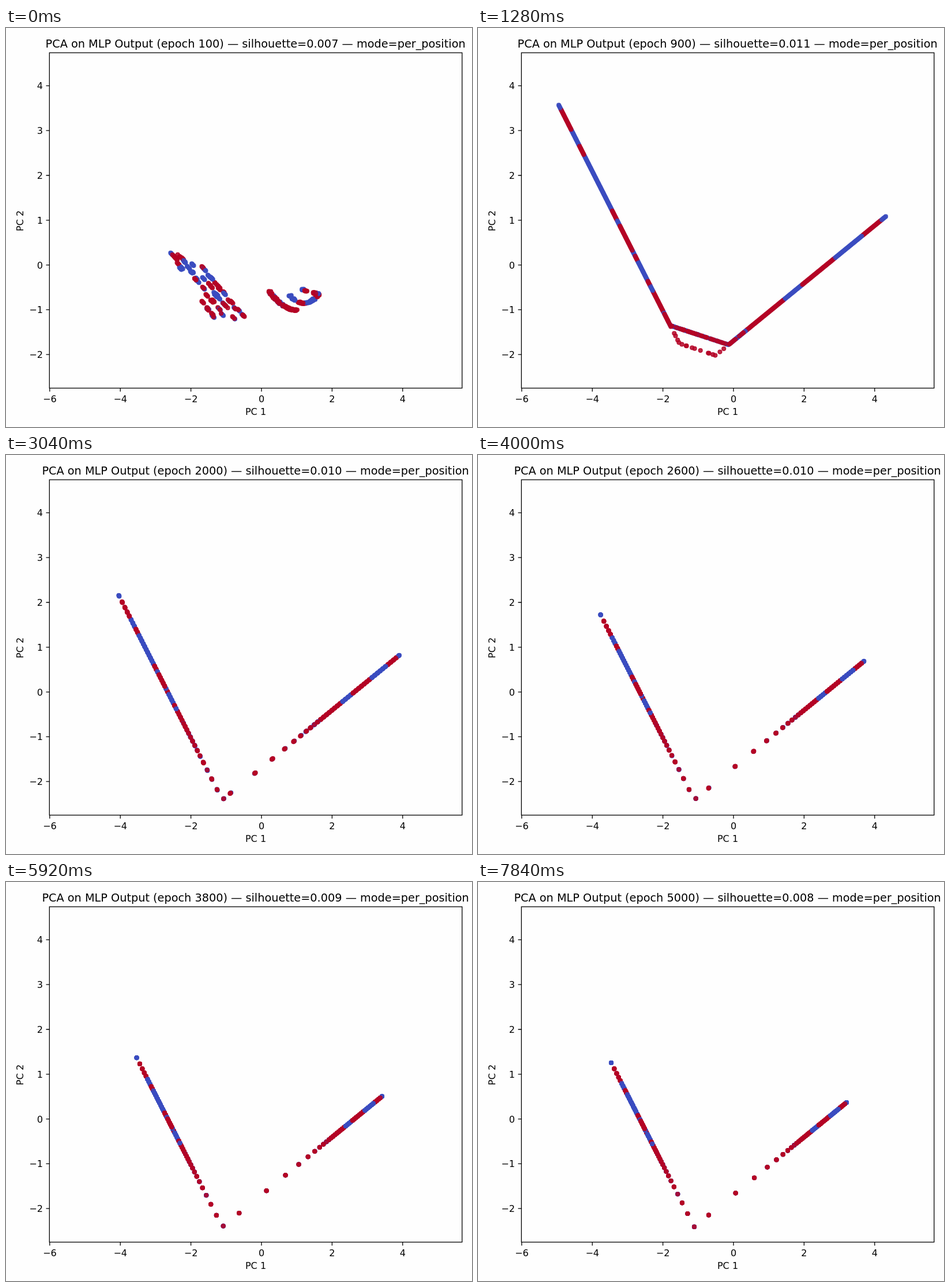
Recreate the animation shown at these times as an HTML page with a canvas. Size 808 px wide and 693 px high, loop 8000 ms.

```html
<!DOCTYPE html>
<html lang="en">
<head>
<meta charset="utf-8">
<title>PCA scatter</title>
<style>
  html, body { margin: 0; width: 100%; height: 100%; overflow: hidden; background: #fefefe; }
  canvas { display: block; }
</style>
</head>
<body>
<canvas id="plot" width="808" height="693"></canvas>
<script>
const ctx = document.getElementById('plot').getContext('2d');
const RED = '#b40426', BLUE = '#3b4cc0';
const STEP_MS = 160, STEPS = 50;

// Each pose gives the x range of both arms (valley to tip), how evenly the
// points are spread along them, and the level where the valley is cut off.
const open = { left: [383, 140], right: [383, 707], even: 1, floor: 518 };
const poses = [
  { ...open, step: 0, score: .007 },
  { ...open, step: 8, score: .011 },
  { step: 12, score: .012, left: [388, 117], right: [388, 754], even: 1, floor: 545 },
  { step: 19, score: .010, left: [378, 195.5], right: [388, 682], even: .3, floor: 640 },
  { step: 32, score: .009, left: [378, 223.5], right: [407, 661], even: .04, floor: 640 },
  { step: 49, score: .008, left: [375, 231], right: [400, 639], even: 0, floor: 640 }
];

let seed = 11;
const random = () => (seed = (seed * 16807) % 2147483647) / 2147483647;
const wobble = size => (random() * 2 - 1) * size;
const lerp = (a, b, p) => a + (b - a) * p;

// rank runs from 0 at the tip of an arm to 1 in the valley.
const arms = [
  {
    side: 'left', clumps: 55,
    settled: rank => .92 - .62 * rank + .08 * (1 - rank) ** 20 - .3 * rank ** 14,
    start(rank) {
      const strand = Math.floor(random() * 4) / 3 + wobble(.06);
      return [
        lerp(287 + 73 * rank, 326 + 90 * rank, strand),
        lerp(392, 399, strand) + 109 * rank
      ];
    }
  },
  {
    side: 'right', clumps: 40,
    settled: rank => 1 - .46 * rank - .54 * rank ** 16,
    start(rank) {
      const low = rank > .55;
      const p = low ? (1 - rank) / .45 : 1 - rank / .55;
      if (low) return [457 + 47 * p, 490 - 32 * (1 - p) ** 2];
      return random() < .25
        ? [513 + 27 * p, 452 + 9 * Math.sqrt(p)]
        : [491 + 56 * p, 478 - 70 * (p - .45) ** 2];
    }
  }
];

function makeArm({ side, clumps, settled, start }) {
  const points = [], copies = 6;
  let color = RED;
  for (let i = 0; i < clumps; i++) {
    const clumpRank = i / (clumps - 1);
    const [startX, startY] = start(clumpRank);
    const nearValley = clumpRank > .75;
    if (random() < .55) color = random() < .7 - .4 * clumpRank ? BLUE : RED;
    for (let copy = 0; copy < copies; copy++) {
      const rank = (i + copy / copies) / clumps;
      const slide = wobble(2.5);
      const pointColor = nearValley ? (random() < .5 ? BLUE : RED) : color;
      const kind = random();
      points.push({
        color: pointColor,
        order: random() + (nearValley && pointColor === RED ? .8 : 0),
        start: [startX + slide, startY + (side === 'left' ? slide : wobble(1))],
        xs: poses.map(pose =>
          lerp(...pose[side], lerp(settled(clumpRank), 1 - rank, pose.even))),
        sink: pointColor === RED && kind < .25 ? 26 : 0
      });
    }
  }
  return points;
}

const points = arms.flatMap(makeArm).sort((a, b) => a.order - b.order);

// Points slide on a fixed V whose bottom is cut off by a sinking floor.
function valley(x, floor) {
  return Math.min(314 + 1.979 * (x - 231), 383 - .818 * (x - 639), floor + .33 * (x - 337));
}

function drawPoint({ color, start, xs, sink }, k, p) {
  let x = lerp(xs[k], xs[k + 1], p);
  let y = valley(x, lerp(poses[k].floor, poses[k + 1].floor, p) + sink);
  if (k === 0) {
    x = lerp(start[0], x, p);
    y = lerp(start[1], y, p);
  }
  ctx.fillStyle = ctx.strokeStyle = color;
  ctx.beginPath();
  ctx.arc(x, y, 3.4, 0, 2 * Math.PI);
  ctx.fill();
  ctx.stroke();
}

function text(string, x, y, size = 16.05, align = 'center') {
  ctx.font = `${size}px "DejaVu Sans", sans-serif`;
  ctx.textAlign = align;
  ctx.fillText(string, x, y);
}

function drawAxes(title) {
  const label = n => String(n).replace('-', '\u2212');
  ctx.fillStyle = ctx.strokeStyle = '#000';
  ctx.lineWidth = 1.3;
  ctx.strokeRect(75.3, 43, 715.5, 582.5);
  ctx.beginPath();
  for (let n = -6; n <= 4; n += 2) {
    const x = 443 + n * 61.2;
    ctx.moveTo(x, 626);
    ctx.lineTo(x, 631.5);
    text(label(n), x, 649.5);
  }
  for (let n = -2; n <= 4; n++) {
    const y = 411.6 - n * 77.8;
    ctx.moveTo(75, y);
    ctx.lineTo(69.5, y);
    text(label(n), 64, y + 6, 16.05, 'right');
  }
  ctx.stroke();
  text('PC 1', 433, 672);
  text(title, 432.6, 33.7, 19.27);
  ctx.save();
  ctx.translate(30, 334.8);
  ctx.rotate(-Math.PI / 2);
  text('PC 2', 0, 0);
  ctx.restore();
}

function draw(now) {
  const step = Math.floor(now / STEP_MS) % STEPS;
  let k = 0;
  while (k < poses.length - 2 && step >= poses[k + 1].step) k++;
  const from = poses[k], to = poses[k + 1];
  const linear = (step - from.step) / (to.step - from.step);
  const eased = 1 - (1 - linear) ** 1.5;

  ctx.fillStyle = '#fefefe';
  ctx.fillRect(0, 0, 808, 693);
  ctx.globalAlpha = .85;
  ctx.lineWidth = 1.4;
  for (const point of points) drawPoint(point, k, eased);
  ctx.globalAlpha = 1;

  const score = lerp(from.score, to.score, linear).toFixed(3);
  drawAxes(`PCA on MLP Output (epoch ${(step + 1) * 100}) — silhouette=${score} — mode=per_position`);
}

const began = performance.now();
function tick() {
  draw(performance.now() - began);
  requestAnimationFrame(tick);
}
tick();
</script>
</body>
</html>
```
